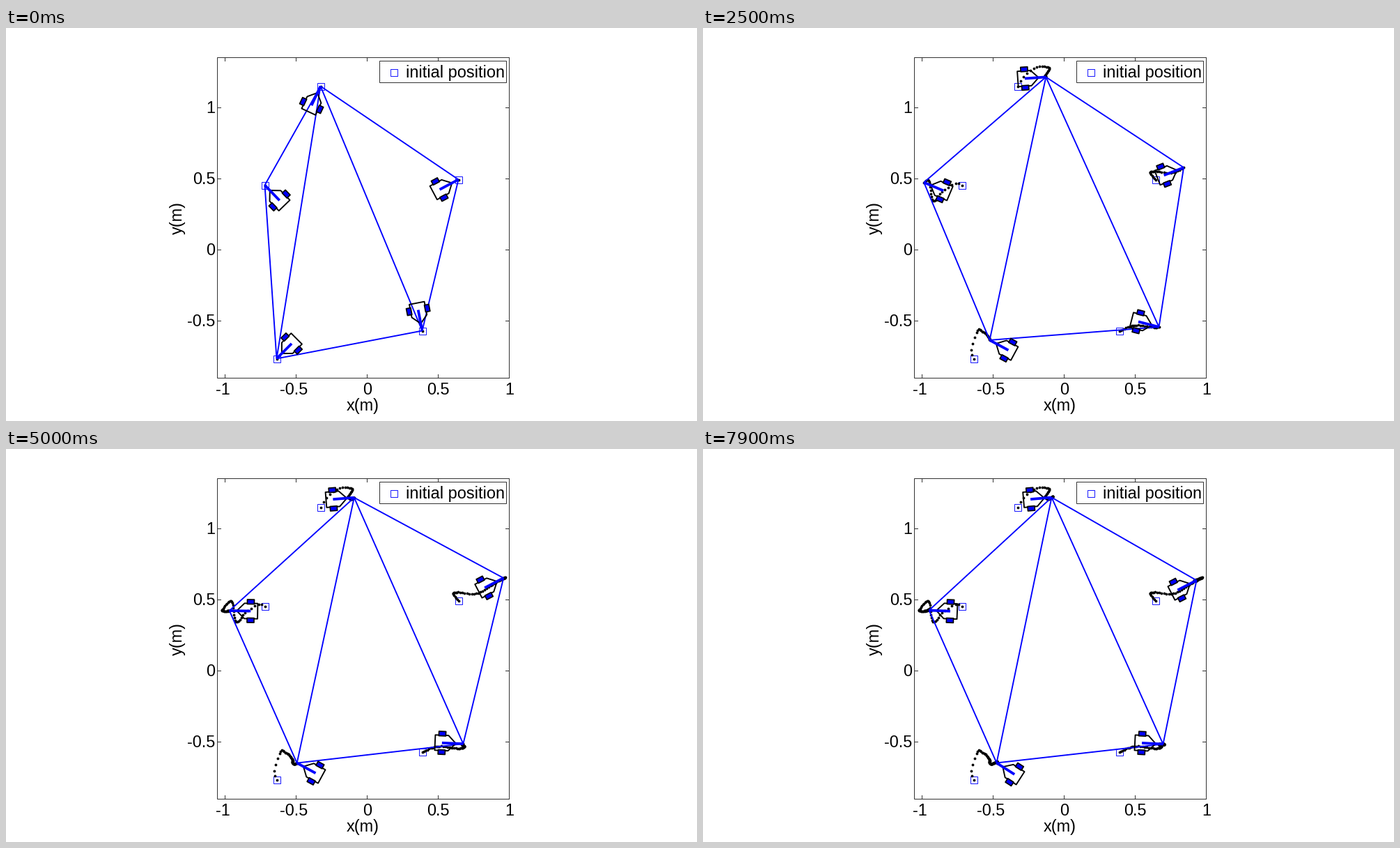
A matplotlib script for the animation above (8000 ms loop, 992 by 564 pixels).

```python
import numpy as np
import matplotlib.pyplot as plt
from matplotlib.animation import FuncAnimation
from matplotlib.collections import LineCollection, PolyCollection
from matplotlib.patches import Rectangle

W, H, DPI = 992, 564, 100
PX = 72 / DPI            # points per pixel
FRAMES, STEP = 80, 100
ARM = 30.5               # distance from body centre to pen tip
SUB = 10                 # integration steps per frame
UNIT = 204.5             # pixels per metre
BLUE, GREY = "#0000ff", "0.2"

plt.rcParams.update({"font.family": "Liberation Sans", "font.size": 23.5 * PX,
                     "path.snap": False})


def path(pts):
    """Smooth curve whose key points lie ever further apart in time."""
    pts = np.array(pts, float)
    keys = (FRAMES - 1) * np.linspace(0, 1, len(pts)) ** 2
    t = np.arange((FRAMES - 1) * SUB + 1) / SUB
    slope = np.gradient(pts, keys, axis=0)
    i = np.clip(np.searchsorted(keys, t, side="right") - 1, 0, len(keys) - 2)
    h = (keys[i + 1] - keys[i])[:, None]
    u = (t - keys[i])[:, None] / h
    return ((1 + 2 * u) * (1 - u) ** 2 * pts[i] + u * (1 - u) ** 2 * h * slope[i]
            + u * u * (3 - 2 * u) * pts[i + 1] + u * u * (u - 1) * h * slope[i + 1])


def robot(heading, *pts):
    """Tip and heading per frame: the body is a unicycle steered by its tip."""
    tip = path(pts)
    ang = [np.radians(heading)]
    for dx, dy in np.diff(tip, axis=0):
        a = ang[-1]
        ang.append(a - (np.sin(a) * dx + np.cos(a) * dy) / ARM)
    return tip[::SUB], ang[::SUB]


robots = [
    robot(65, (451, 83), (456, 74), (474, 58), (495, 56), (491, 67),
          (494, 71), (498, 70), (501, 68), (500, 69)),
    robot(28, (649, 217), (647, 215), (642, 208), (647, 205), (674, 207),
          (704, 190), (716, 184), (705, 188), (708, 188)),
    robot(-79, (597, 434), (600, 433), (609, 429), (622, 426), (647, 429),
          (657, 427), (654, 423), (661, 423), (660, 423)),
    robot(225, (388, 474), (385, 467), (392, 437), (402, 436), (410, 444),
          (411, 450), (415, 451), (421, 448), (421, 450)),
    robot(134, (371, 225), (366, 222), (347, 231), (331, 248), (324, 219),
          (310, 230), (318, 232), (323, 230), (324, 231)),
]
TIPS = np.array([tip for tip, _ in robots])
ANGS = np.array([ang for _, ang in robots])
# The outer ring, plus two diagonals from the top robot
LINKS = [(i, (i + 1) % 5) for i in range(5)] + [(0, 2), (0, 3)]

# Robot parts: (forward, sideways) from the body centre
BODY = np.array([(-10, -11), (9, -11), (20, 0), (9, 11), (-10, 11)])
WHEEL = np.array([(-5, 10), (5, 10), (5, 16.5), (-5, 16.5)])
PARTS = [BODY, WHEEL, WHEEL * (1, -1)]

# Data units are pixels, whole numbers being pixel centres
fig = plt.figure(figsize=(W / DPI, H / DPI), dpi=DPI, facecolor="white")
ax = fig.add_axes([0, 0, 1, 1])
ax.set_xlim(-0.5, W - 0.5)
ax.set_ylim(H - 0.5, -0.5)
ax.axis("off")


def box(x0, y0, x1, y1, z):
    ax.add_patch(Rectangle((x0, y0), x1 - x0, y1 - y0, fc="white", ec=GREY,
                           lw=PX, zorder=z))


def tick(x, y, dx, dy):
    ax.plot([x, x + dx], [y, y + dy], color=GREY, lw=PX, zorder=1)


def label(x, y, s, ha="center", **kw):
    ax.text(x, y, s, ha=ha, va="baseline", color="black", zorder=9, **kw)


def squares(x, y, z):
    ax.plot(x, y, "s", ms=10 * PX, mfc="none", mec=BLUE, mew=0.9 * PX, zorder=z)


X0, Y0, X1, Y1 = 303, 42, 722, 502
box(X0, Y0, X1, Y1, 0)
for v in np.arange(-1, 1.5, 0.5):
    x, y = round(518 + UNIT * v), round(318 - UNIT * v)
    tick(x, Y1, 0, -5)
    tick(x, Y0, 0, 5)
    label(x - 3.5 * (v < 0), 526, f"{v:g}")
    if y < Y1:
        tick(X0, y, 5, 0)
        tick(X1, y, -5, 0)
        label(300, y + 8, f"{v:g}", ha="right")
label(512, 548, "x(m)")
label(252, 272, "y(m)", rotation=90, rotation_mode="anchor")

box(536, 47, 718, 78, 7)
squares([556], [63], 8)
label(573, 71, "initial position", ha="left")

squares(*TIPS[:, 0].T, 2)
trail, = ax.plot([], [], "o", ms=3.8 * PX, mfc="black", mec="none", zorder=3)
links = LineCollection([], colors=BLUE, lw=1.9 * PX, zorder=4)
bodies = PolyCollection([], facecolors="none", edgecolors="black", lw=1.9 * PX, zorder=5)
wheels = PolyCollection([], facecolors=BLUE, edgecolors="black", lw=1.7 * PX, zorder=5.2)
arms = LineCollection([], colors=BLUE, lw=3.8 * PX, zorder=5.4)
for c in (links, bodies, wheels, arms):
    ax.add_collection(c, autolim=False)


def draw(n):
    tips, angs = TIPS[:, n], ANGS[:, n]
    fwd = np.column_stack([np.cos(angs), -np.sin(angs)])
    mids = tips - ARM * fwd
    placed = [[mid + part @ np.array([(fx, fy), (-fy, fx)]) for part in PARTS]
              for mid, (fx, fy) in zip(mids, fwd)]
    trail.set_data(*TIPS[:, :n + 1].reshape(-1, 2).T)
    links.set_segments([tips[[a, b]] for a, b in LINKS])
    arms.set_segments(list(np.stack([tips, mids], axis=1)))
    bodies.set_verts([p[0] for p in placed])
    wheels.set_verts([w for p in placed for w in p[1:]])
    return trail, links, arms, bodies, wheels


anim = FuncAnimation(fig, draw, frames=FRAMES, interval=STEP, repeat=True,
                     repeat_delay=0, blit=False)
plt.show()
```
